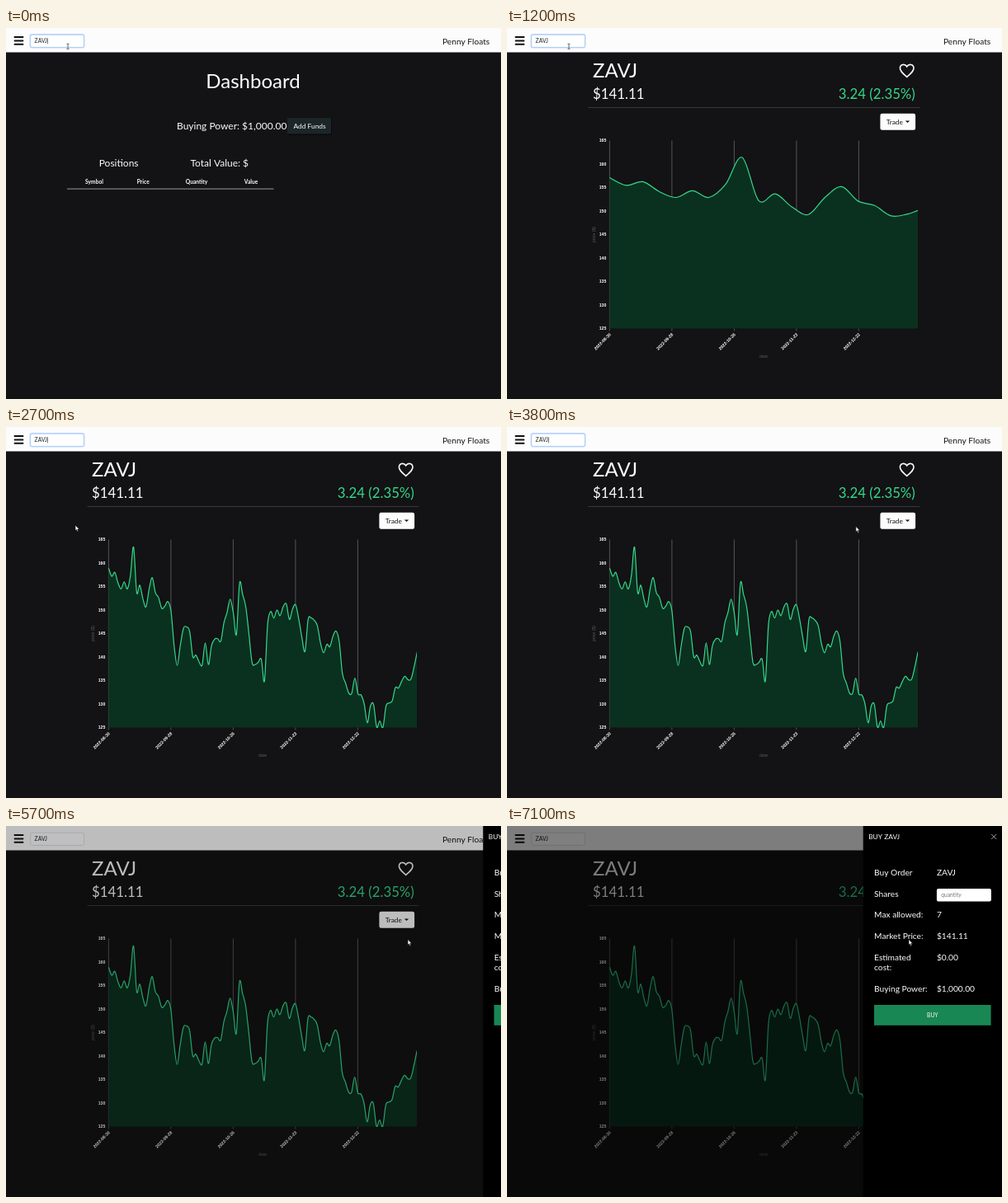
These frames come from a looping animation (600x450 px, 7200 ms). An HTML page with a canvas:

```html
<!DOCTYPE html>
<html lang="en">
<head>
<meta charset="utf-8">
<title>Trading dashboard</title>
<style>
html, body { margin: 0; width: 100%; height: 100%; overflow: hidden; background: #131214; }
canvas { display: block; width: 600px; height: 450px; }
</style>
</head>
<body>
<canvas id="stage"></canvas>
<script>
const LOOP = 7200, STEP = 100;
const TICKER = "ZAVJ", BRAND = "Penny Floats";
const BG = "#131214", WHITE = "#fcfcfd", GREEN = "#34d88c";
const UI = "Lato, sans-serif", AXIS = "'Liberation Sans', Arial, sans-serif";

const TIME = { page: 600, chart: 660, leaveInput: 2500, openMenu: 4600, drawer: 5625 };
const PLOT = { left: 124.4, right: 498, top: 136.5, bottom: 364.5 };
const DATES = ["2022-08-30", "2022-09-28", "2022-10-26", "2022-11-23", "2022-12-22"];

// Daily closing prices
const PRICES = [
  158.9, 157.2, 158, 155.8, 154.5, 156, 154.5, 157.4, 163.4, 153.8, 155.3, 152.4, 150.7, 154.5, 156.9, 153.7, 152.7, 150.4, 150.8, 151.8,
  149.8, 142.5, 138.2, 142.5, 146.1, 146.4, 145.4, 140.1, 140.4, 139, 138.3, 143, 138.4, 142.4, 143.8, 143.9, 143.4, 147.3, 149.5, 152.3,
  149.4, 144.8, 155.7, 153.3, 150.7, 145, 138.9, 138.4, 138.9, 139.5, 134.9, 146.9, 149.7, 148.3, 150, 148.8, 150.7, 151.3, 148, 150.2,
  151.1, 148.1, 144.2, 141.2, 148, 148.3, 147.8, 146.6, 142.9, 140.9, 142.7, 142.2, 144.5, 145.5, 143.2, 136.5, 134.5, 132.4, 132.3, 135.5,
  132.2, 131.9, 130, 126, 129.6, 129.9, 125.1, 126.4, 125, 129.6, 130.2, 130.7, 133.5, 133.4, 134.8, 135.9, 135.2, 135.3, 137.9, 141.1
];

const canvas = document.getElementById("stage");
const ctx = canvas.getContext("2d");
const ratio = window.devicePixelRatio || 1;
canvas.width = 600 * ratio;
canvas.height = 450 * ratio;

const clamp01 = v => Math.max(0, Math.min(1, v));
const lerp = (a, b, p) => a + (b - a) * p;

// CSS ease-in-out: cubic-bezier(.42, 0, .58, 1)
function easeInOut(x) {
  let lo = 0, hi = 1;
  for (let i = 0; i < 20; i++) {
    const u = (lo + hi) / 2, v = 1 - u;
    if (3 * v * v * u * 0.42 + 3 * v * u * u * 0.58 + u ** 3 < x) lo = u; else hi = u;
  }
  return lo * lo * (3 - 2 * lo);
}

function text(str, x, y, size, color = WHITE, { font = UI, weight = "", align = "left" } = {}) {
  ctx.font = `${weight} ${size}px ${font}`;
  ctx.textAlign = align;
  ctx.fillStyle = color;
  ctx.fillText(str, x, y);
}

function turnedText(str, x, y, angle, color, options) {
  ctx.save();
  ctx.translate(x, y);
  ctx.rotate(angle);
  text(str, 0, 0, 5.2, color, { font: AXIS, ...options });
  ctx.restore();
}

function rect(x, y, w, h, color) {
  ctx.fillStyle = color;
  ctx.fillRect(x, y, w, h);
}

function box(x, y, w, h, radius, fill, stroke, width = 0.7) {
  ctx.beginPath();
  ctx.roundRect(x, y, w, h, radius);
  if (fill) { ctx.fillStyle = fill; ctx.fill(); }
  if (stroke) { ctx.strokeStyle = stroke; ctx.lineWidth = width; ctx.stroke(); }
}

function line(points, color, width) {
  ctx.beginPath();
  points.forEach(([x, y]) => ctx.lineTo(x, y));
  ctx.strokeStyle = color;
  ctx.lineWidth = width;
  ctx.stroke();
}

function shape(points, fill, stroke) {
  ctx.beginPath();
  points.forEach(([x, y]) => ctx.lineTo(x, y));
  ctx.closePath();
  ctx.fillStyle = fill;
  ctx.fill();
  if (stroke) { ctx.strokeStyle = stroke; ctx.lineWidth = 0.7; ctx.stroke(); }
}

function drawHeader(t) {
  rect(0, 0, 600, 29.5, WHITE);
  for (const y of [10, 14.4, 18.8]) box(9.7, y, 11.6, 2, 0.6, "#111");
  const focused = t < TIME.openMenu;
  if (focused) box(28.5, 7, 67, 17.5, 3, "#c3dbfe");
  box(29.7, 8.2, 64.8, 15.2, 2, "#fff", focused ? "#93bdf8" : "#ced4da");
  text(TICKER, 34.6, 18.2, 6.8, "#212529");
  const caretOn = t < 100 || (t - 100) % 1000 >= 500;
  if (focused && caretOn) rect(35 + ctx.measureText(TICKER).width, 12.3, 0.6, 7, "#222");
  text(BRAND, 529, 19.5, 10.2, "#151515");
}

function drawDashboard() {
  text("Dashboard", 299.5, 73, 24, WHITE, { align: "center" });
  text("Buying Power: $1,000.00", 207, 123.3, 12);
  box(342, 110, 53, 20, 1, "#090a0b");
  box(341, 109, 53, 19.5, 1, "#1c2527");
  text("Add Funds", 348.5, 122.4, 8.4);
  text("Positions", 112.7, 168, 12);
  text("Total Value: $", 223.5, 168, 12);
  [["Symbol", 96], ["Price", 158.7], ["Quantity", 217.8], ["Value", 288.8]]
    .forEach(([label, x]) => text(label, x, 189, 6.7, WHITE, { weight: "bold" }));
  rect(74, 194.7, 250.5, 0.8, "#b8b8ba");
}

function drawHeart() {
  ctx.beginPath();
  ctx.moveTo(484.7, 59.4);
  ctx.bezierCurveTo(479, 54.5, 476.4, 52, 476.4, 48.8);
  ctx.bezierCurveTo(476.4, 43.7, 482.3, 43, 484.7, 46.8);
  ctx.bezierCurveTo(487.1, 43, 493, 43.7, 493, 48.8);
  ctx.bezierCurveTo(493, 52, 490.4, 54.5, 484.7, 59.4);
  ctx.closePath();
  ctx.strokeStyle = WHITE;
  ctx.lineWidth = 1.6;
  ctx.stroke();
}

function priceY(price) {
  return PLOT.bottom - (price - 125) * 5.7;
}

// The series starts stretched far past the right edge and settles into place.
function tracePrices(t) {
  const rest = Math.min(1, 0.436 * Math.exp(-5.73 * (t - 800) / 1000));
  const gap = lerp(3.775, 373.7, rest);
  const points = PRICES.map((price, i) => [PLOT.left + i * gap, priceY(lerp(price, 118, rest))]);
  const at = i => points[Math.max(0, Math.min(points.length - 1, i))];
  const path = new Path2D();
  path.moveTo(...points[0]);
  for (let i = 0; i < points.length - 1; i++) {
    const [a, b, c, d] = [at(i - 1), at(i), at(i + 1), at(i + 2)];
    path.bezierCurveTo(
      b[0] + (c[0] - a[0]) / 6, b[1] + (c[1] - a[1]) / 6,
      c[0] - (d[0] - b[0]) / 6, c[1] - (d[1] - b[1]) / 6, c[0], c[1]);
  }
  return { path, endX: points[points.length - 1][0] };
}

function drawChart(t) {
  const { left, right, top, bottom } = PLOT;
  DATES.forEach((date, i) => {
    const x = left + i * 75.5;
    line([[x, top], [x, bottom]], "#717173", 0.7);
    line([[x, bottom], [x, bottom + 3]], "#777", 0.6);
    turnedText(date, x + 2, 372.2, -Math.PI / 4, WHITE, { weight: "bold", align: "right" });
  });
  for (let price = 125; price <= 165; price += 5) {
    text(price, 120.3, priceY(price) + 1.9, 5.2, WHITE, { font: AXIS, weight: "bold", align: "right" });
  }
  turnedText("price ($)", 106.6, 250.5, -Math.PI / 2, "#58585a", { align: "center" });
  turnedText("date", 311, 400.3, 0, "#58585a", { align: "center" });

  if (t < TIME.chart) return;
  const { path, endX } = tracePrices(t);
  ctx.save();
  ctx.beginPath();
  ctx.rect(left - 0.6, 110, right - left + 0.6, bottom - 109.5);
  ctx.clip();
  const area = new Path2D(path);
  area.lineTo(endX, bottom);
  area.lineTo(left, bottom);
  area.closePath();
  ctx.fillStyle = "#0a311f";
  ctx.fill(area);
  ctx.strokeStyle = GREEN;
  ctx.lineWidth = 1.2;
  ctx.lineJoin = "round";
  ctx.stroke(path);
  ctx.restore();
}

function drawStock(t) {
  text(TICKER, 104, 60, 24);
  text("$141.11", 104, 85.6, 16.8);
  text("3.24 (2.35%)", 494.8, 85.6, 16.8, GREEN, { align: "right" });
  drawHeart();
  rect(98.5, 96.2, 402, 0.7, "#48474a");
  drawChart(t);

  const open = t >= TIME.openMenu && t < TIME.drawer;
  if (open) box(450.7, 102, 46.2, 23.6, 3.5, "#77777a");
  box(452.4, 103.8, 42.7, 20, 2.3, WHITE);
  text("Trade", 459.7, 117, 8.4, "#151515");
  shape([[482.8, 112.4], [488.2, 112.4], [485.5, 115.1]], "#151515");
  if (open) {
    box(453, 125.2, 66.6, 38.8, 2, WHITE);
    text("Buy", 459.8, 139.8, 8.4, "#212529");
    text("Sell", 459.8, 156, 8.4, "#212529");
  }
}

function drawDrawer(t) {
  const age = t - TIME.drawer;
  if (age < 0) return;
  rect(0, 0, 600, 450, `rgba(0,0,0,${0.5 * clamp01(age / 150)})`);
  ctx.save();
  ctx.translate(lerp(600, 431.7, easeInOut(clamp01(age / 300))), 0);
  rect(0, 0, 170, 450, "#000");
  text("BUY " + TICKER, 6.5, 16.4, 8.4);
  line([[155.5, 10], [161.5, 16]], "#aaa", 0.9);
  line([[161.5, 10], [155.5, 16]], "#aaa", 0.9);
  [
    ["Buy Order", 59.6, TICKER], ["Shares", 85.5, ""], ["Max allowed:", 111.4, "7"],
    ["Market Price:", 137.3, "$141.11"], ["Estimated", 163, "$0.00"], ["cost:", 175, ""],
    ["Buying Power:", 201, "$1,000.00"]
  ].forEach(([label, y, value]) => {
    text(label, 13.4, y, 10.2);
    text(value, 89.2, y, 10.2);
  });
  box(89.2, 76, 66, 15.5, 2, "#fff");
  text("quantity", 94.6, 86.2, 6.7, "#74797e");
  rect(13.3, 217, 141.6, 24.8, "#198754");
  text("BUY", 84.1, 232, 6.7, WHITE, { align: "center" });
  ctx.restore();
}

const CURSOR_PATH = [
  [2400, 75, 22], [2700, 84, 119], [3300, 300, 124], [4000, 472, 119],
  [4300, 487, 118], [5100, 487, 118], [5400, 487, 137.5]
];

function cursorAt(t) {
  const next = CURSOR_PATH.findIndex(key => key[0] > t);
  if (next === 0) return CURSOR_PATH[0].slice(1);
  if (next < 0) return CURSOR_PATH[CURSOR_PATH.length - 1].slice(1);
  const a = CURSOR_PATH[next - 1], b = CURSOR_PATH[next];
  const p = (t - a[0]) / (b[0] - a[0]);
  return [lerp(a[1], b[1], p), lerp(a[2], b[2], p)];
}

function drawCursor(t) {
  ctx.save();
  ctx.translate(...cursorAt(t));
  if (t < TIME.leaveInput) {
    line([[-1.6, -2.8], [1.6, -2.8]], "#444", 0.7);
    line([[0, -2.8], [0, 3.4]], "#444", 0.8);
    line([[-1.6, 3.4], [1.6, 3.4]], "#444", 0.7);
  } else if (t >= 4000 && t < TIME.drawer) {
    shape([[-1, 0.2], [0.4, 0.2], [0.6, 3], [3.8, 4], [4, 6.4], [2.8, 9], [-1, 9],
      [-3, 5.6], [-2.4, 4.8], [-1, 6]], "#fff", "#222");
  } else {
    shape([[0, 0], [0, 6.8], [1.5, 5.5], [2.6, 8], [3.8, 7.5], [2.7, 5.1], [4.8, 5]], "#fff", "#111");
  }
  ctx.restore();
}

function render(t) {
  ctx.setTransform(ratio, 0, 0, ratio, 0, 0);
  rect(0, 0, 600, 450, BG);
  drawHeader(t);
  if (t < TIME.page) drawDashboard(); else drawStock(t);
  drawDrawer(t);
  drawCursor(t);
}

function tick() {
  render(Math.floor((performance.now() % LOOP) / STEP) * STEP);
  requestAnimationFrame(tick);
}
tick();
</script>
</body>
</html>
```
